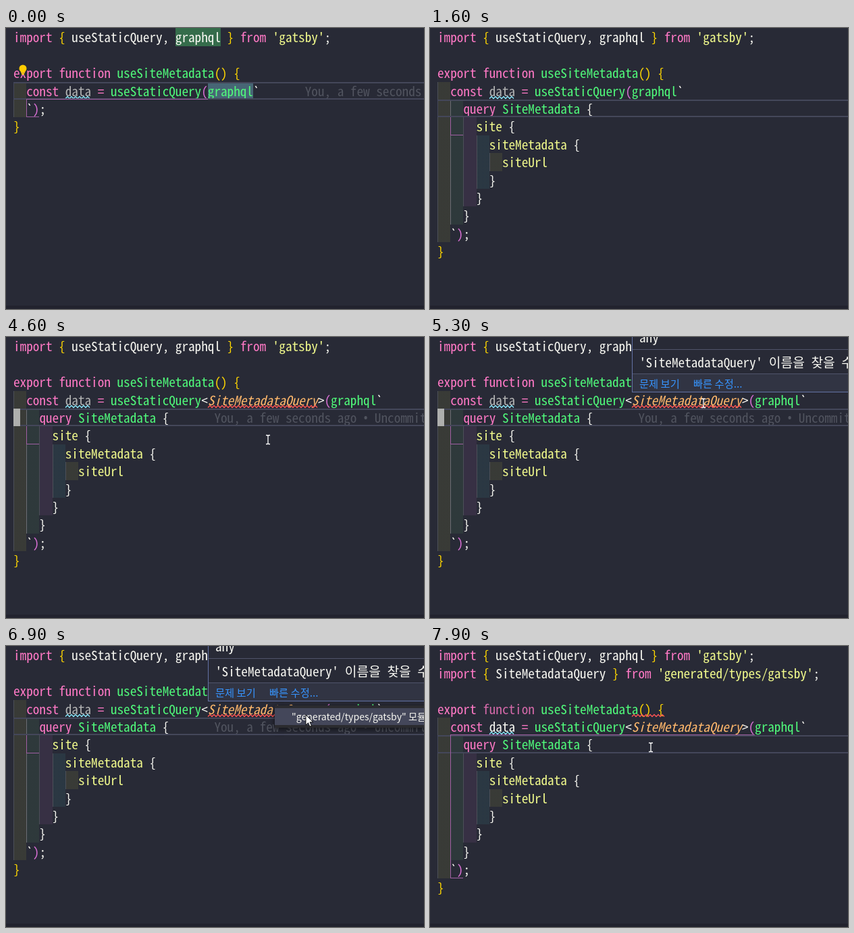
An HTML page that plays this animation: 619x416 px, repeating every 8000 ms.

```html
<!DOCTYPE html>
<html lang="en">
<head>
<meta charset="utf-8">
<title>Typed query</title>
<style>
html, body { margin: 0; width: 100%; height: 100%; overflow: hidden; background: #282a36; }
#stage {
  --ch: 9.6px;
  position: relative; width: 619px; height: 416px; overflow: hidden; background: #282a36; color: #f8f8f2;
  font: 19.2px/26px "Noto Sans Mono CJK KR", "Noto Sans Mono CJK JP", "Noto Sans Mono", monospace;
  font-variant-ligatures: none;
}
#stage div, #stage svg { position: absolute; }
[hidden] { display: none !important; }
.row { left: 11px; white-space: pre; }
.row > span, .row > em { position: relative; }
.p { color: #ff79c6; } .g { color: #50fa7b; } .y { color: #f1fa8c; }
.b { color: #ffd700; } .o { color: #da70d6; } em { color: #ffb86c; }
.raw .tok span { color: #f8f8f2; }
.blame { color: #51545f; }
.blame i { font: 19.2px/1 "Noto Sans", sans-serif; }
.dim { opacity: .667; }
.in {
  left: 0; top: 0; height: 100%; width: calc(var(--n) * 19.2px);
  --rainbow: repeating-linear-gradient(90deg, #ffff4014 0 19.2px, #7fff7f12 0 38.4px, #ff7fff12 0 57.6px, #4fecec12 0 76.8px);
  background: repeating-linear-gradient(90deg, #4c4f58 0 1px, #0000 0 19.2px), var(--rainbow);
}
.raw .tok .in { --rainbow: none; }
.tok .in::after { content: ""; position: absolute; left: 19px; top: 0; width: 1px; height: 100%; background: #6a6c74; }
.hl { left: calc(var(--c) * var(--ch)); width: calc(7 * var(--ch)); top: 0; height: 100%; }
#line { left: 11px; width: 620px; box-sizing: border-box; border: 2px solid #44475a; border-left-width: 1px; }
#caret { width: 9.6px; background: #aeafad; }
.over, .side { box-sizing: border-box; left: 30px; width: 19px; border: 0 solid #a05fa3; }
.over { border-bottom-width: 1px; }
.side { border-left-width: 1px; }
svg { overflow: visible; fill: none; }
.sq { top: 20.5px; left: calc(var(--c) * var(--ch)); stroke-width: 1.3; width: 1px; height: 1px; }
#hover { left: 299px; top: -30px; width: 340px; height: 112px; box-sizing: border-box; border: 1px solid #6272a4; background: #282a36; white-space: pre; }
#hover div { left: 10px; }
#hover .bar { left: 0; right: 0; top: 83px; height: 26px; background: #313443; border-top: 1px solid #50546a; }
#hover .rule { left: 0; right: 0; top: 47px; height: 1px; background: #50546a; }
#hover .bar span { position: absolute; top: 0; color: #3794ff; }
.ui { font: 15.3px/27px "Noto Sans CJK KR", "Noto Sans CJK JP", sans-serif; }
#menu { left: 398px; top: 88px; width: 240px; height: 33px; background: #2b2b2f; box-shadow: 0 2px 8px #0009; white-space: pre; }
#menu div { left: 0; top: 4px; width: 100%; height: 25px; line-height: 25px; text-indent: 25px; font-size: 14.1px; font-weight: 300; }
#menu .hot { background: #44475a; }
#foot { left: 0; top: 411px; width: 100%; height: 5px; background: #22232e; }
#mouse { left: 0; top: 0; width: 1px; height: 1px; }
</style>
</head>
<body>
<div id="stage">
  <div class="row" data-row="0"><div class="hl" style="--c:25;background:#50fa7b50" data-on="0-700"></div><span class="p">import</span> <span class="b">{</span><span> useStaticQuery, graphql </span><span class="b">}</span> <span class="p">from</span> <span class="y">'gatsby'</span>;</div>
  <div class="row" data-row="1" data-on="7300-8000"><span class="p">import</span> <span class="b">{</span> SiteMetadataQuery <span class="b">}</span> <span class="p">from</span> <span class="y">'generated/types/gatsby'</span>;</div>

  <div id="code">
    <div class="row" data-row="2"><span class="p">export</span> <span class="p" id="fn">function</span> <span class="g">useSiteMetadata</span><span class="b">()</span> <span class="b">{</span><svg class="sq" data-sq="30 5" stroke="#ff5555" data-on="7900-8000"></svg></div>
    <div class="row" data-row="3"><div class="in" style="--n:1"></div><div class="hl" style="--c:30;background:#8be9fd50" data-on="0-700"></div>  <span class="p">const</span> <span id="data">data</span> <span class="p">=</span> <span class="g">useStaticQuery</span><span data-on="3100-8000">&lt;<em>SiteMetadataQuery</em>&gt;</span><span class="o">(</span><span class="g">graphql</span><span>`</span><span class="blame" data-on="0-600">       You, a few seconds ago <i>•</i> Uncommitted changes</span><svg class="sq" data-sq="8 4" stroke="#8be9fd" data-on="0-3100 3500-8000"></svg><svg class="sq" data-sq="30 17" stroke="#ff5555" data-on="3500-7900"></svg></div>
    <div class="tok" data-on="1000-8000">
      <div class="row" data-row="4"><div class="in" style="--n:2"></div>    <span class="p">query</span> <span class="g">SiteMetadata</span> {<span class="blame" data-on="3500-7200">       You, a few seconds ago <i>•</i> Uncommitted changes</span></div>
      <div class="row" data-row="5"><div class="in" style="--n:3"></div>      <span class="y">site</span> {</div>
      <div class="row" data-row="6"><div class="in" style="--n:4"></div>        <span class="y">siteMetadata</span> {</div>
      <div class="row" data-row="7"><div class="in" style="--n:5"></div>          <span class="y">siteUrl</span></div>
      <div class="row" data-row="8"><div class="in" style="--n:4"></div>        }</div>
      <div class="row" data-row="9"><div class="in" style="--n:3"></div>      }</div>
      <div class="row" data-row="10"><div class="in" style="--n:2"></div>    }</div>
    </div>
    <div id="tail">
      <div class="row" data-row="4"><div class="in" style="--n:1"></div>  <span>`</span><span class="o">)</span>;</div>
      <div class="row" data-row="5"><span class="b">}</span></div>
    </div>
    <div id="line"></div>
    <div class="over" style="width:269px" data-row="3" data-on="0-1100"></div>
    <div class="side" data-row="4" data-on="0-1100"></div>
    <div class="over" data-row="4" data-on="0-600"></div>
    <div class="over side" data-row="5" data-on="600-1000 1100-7900"></div>
    <div class="over" style="width:451px" data-row="3" data-on="7900-8000"></div>
    <div class="over side" data-row="4" data-span="8" data-on="7900-8000"></div>
    <div id="caret" data-on="200-1600 2100-3700 4200-4700 5200-5700 7300-7800"></div>
    <svg style="left:25px;top:60px" width="1" height="1" data-on="0-1000"><circle r="5.5" fill="#ffcc00"/><path d="M-3 3h6v3.5h-6z" fill="#ffcc00"/><path d="M-2 8h4" stroke="#ffcc00" stroke-width="2"/></svg>
  </div>

  <div id="hover" data-on="5300-7200">
    <div style="top:16px">any</div>
    <div class="rule"></div>
    <div style="top:53px">'SiteMetadataQuery' 이름을 찾을 수 없습니다.</div>
    <div class="bar ui"><span style="left:10px">문제 보기</span><span style="left:90px">빠른 수정...</span></div>
  </div>
  <div id="menu" class="ui" data-on="6200-7200"><div id="item">"generated/types/gatsby" 모듈에서 가져오기</div></div>
  <div id="foot"></div>
  <svg id="mouse" data-on="3100-8000">
    <path id="beam" d="M-3-6.5h2l1 1 1-1h2M0-5.5v11M-3 6.5h2l1-1 1 1h2" stroke="#fff" stroke-width="1.3"/>
    <path id="arrow" d="M0 0v15l3.5-3.3 2.4 5.5 2.5-1.1-2.4-5.3h4.8z" fill="#fff" stroke="#000" stroke-width=".9"/>
  </svg>
</div>
<script>
const LOOP = 8000, STEP = 100, ROW = 26.4, CH = 9.6;
const $ = id => document.getElementById(id);

// Wavy underlines: start column and length in characters
for (const svg of document.querySelectorAll('[data-sq]')) {
  const [col, len] = svg.dataset.sq.split(' ').map(Number);
  svg.style.setProperty('--c', col);
  let d = 'M0 3.5';
  for (let x = 3, up = true; x <= len * CH; x += 3, up = !up) d += `L${x} ${up ? .5 : 3.5}`;
  svg.innerHTML = `<path d="${d}"/>`;
}

const timed = [...document.querySelectorAll('[data-on]')].map(el => ({
  el, spans: el.dataset.on.split(' ').map(s => s.split('-').map(Number))
}));
const within = (t, spans) => spans.some(([a, b]) => t >= a && t < b);

// Rows sit on whole pixels
const rowTop = r => Math.round(r * ROW + .35);
function place(el, row, span = 1) {
  const top = rowTop(row);
  el.style.top = top + 'px';
  el.style.height = rowTop(row + span) - top + 'px';
}
const placed = [...document.querySelectorAll('[data-row]')].map(el => ({
  el, row: +el.dataset.row, span: +(el.dataset.span || 1),
  inCode: !!el.closest('#code'), inTail: !!el.closest('#tail')
}));

// Pointer path: time, x, y
const path = [
  [3100, 280, 249], [3500, 284, 290], [3700, 286, 296], [3900, 296, 300], [4500, 387, 176], [4600, 388, 152],
  [5000, 405, 98], [5500, 405, 98], [6000, 421, 65], [6600, 421, 65], [6900, 444, 102], [7500, 444, 102], [7900, 327, 150]
];
function pointer(t) {
  const i = path.findIndex(p => p[0] > t);
  if (i < 0) return path[path.length - 1].slice(1);
  if (!i) return path[0].slice(1);
  const [t0, x0, y0] = path[i - 1], [t1, x1, y1] = path[i], k = (t - t0) / (t1 - t0);
  return [Math.round(x0 + (x1 - x0) * k), Math.round(y0 + (y1 - y0) * k)];
}

// Text caret: row and column
const caretAt = t => t < 600 ? [3, 37] : t < 1000 ? [4, 4] : t < 1100 ? [10, 5] : [4, 0];

function render(t) {
  for (const { el, spans } of timed) el.toggleAttribute('hidden', !within(t, spans));
  $('stage').classList.toggle('raw', t < 1100);
  $('data').classList.toggle('dim', t < 3100 || within(t, [[3500, 7900]]));
  $('fn').style.opacity = t >= 7900 ? .8 : 1;
  $('item').classList.toggle('hot', t >= 6800);

  const shift = t >= 7300 ? 1 : 0, pushed = t < 600 ? 0 : t < 1000 ? 1 : 7;
  for (const { el, row, span, inCode, inTail } of placed)
    place(el, row + (inCode ? shift : 0) + (inTail ? pushed : 0), span);

  const [row, col] = caretAt(t);
  place($('line'), row + shift);
  place($('caret'), row + shift);
  $('caret').style.left = 11 + col * CH + 'px';

  const [x, y] = pointer(t), arrow = t < 7200 && t >= 5300 && y < 84 || within(t, [[6200, 7200]]);
  $('mouse').style.left = x + 'px';
  $('mouse').style.top = y + 'px';
  $('arrow').style.display = arrow ? '' : 'none';
  $('beam').style.display = arrow ? 'none' : '';
}

function tick() {
  const t = performance.now() % LOOP;
  render(Math.floor(t / STEP) * STEP);
  requestAnimationFrame(tick);
}
tick();
</script>
</body>
</html>
```
